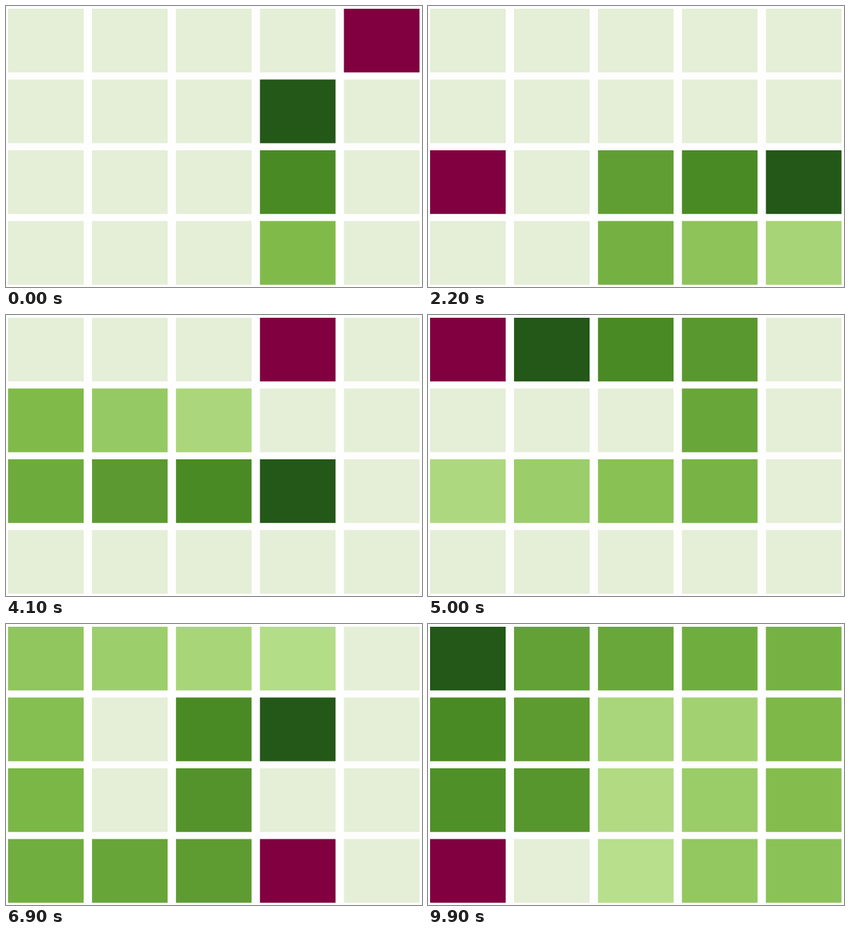
An HTML page with a canvas that plays this animation: 600x407 px, repeating every 10 s.

```html
<!DOCTYPE html>
<html lang="en">
<head>
<meta charset="utf-8">
<title>Snake</title>
<style>
  html, body { margin: 0; width: 100%; height: 100%; overflow: hidden; background: #fefefe; }
  canvas { display: block; }
</style>
</head>
<body>
<canvas id="board" width="600" height="407"></canvas>
<script>
const ctx = document.getElementById('board').getContext('2d');
const COLS = 5, ROWS = 4, LOOP = 10000, FRAME = 100, MOVE = 214, LEAD = 8;
const EMPTY = '#e5eed7', FOOD = '#800040', HEAD = '#235818';
const BODY = [[74, 138, 36], [128, 187, 74], [192, 228, 148]];

// The first two steps lay out the starting body.
const STEPS = 'UU' + 'URDDDL' + 'LURRULLL' + 'LDRRR' + 'UULLLDDDR' + 'RUURDDRUU' + 'ULLLDDLUU';
const START = 2, START_LENGTH = 3;
const DIRS = { U: [0, -1], D: [0, 1], L: [-1, 0], R: [1, 0] };
const path = [[3, 3]];
for (const step of STEPS) {
  const [x, y] = path[path.length - 1], [dx, dy] = DIRS[step];
  path.push([x + dx, y + dy]);
}

// Move numbers at which the snake eats.
const MEALS = [2, 7, 10, 16, 21, 24, 27, 29, 31, 34, 35, 36, 39, 43, 46];
const LAST_FOOD = [0, 3];

function bodyColor(t) {
  const i = t < 0.5 ? 0 : 1, f = t * 2 - i;
  const mix = BODY[i].map((v, c) => Math.round(v + (BODY[i + 1][c] - v) * f));
  return `rgb(${mix})`;
}

function cell([col, row], color) {
  ctx.fillStyle = color;
  ctx.fillRect(3 + col * 121.1, 4 + row * 102.5, 109, 92.2);
}

function draw(move) {
  ctx.fillStyle = '#fefefe';
  ctx.fillRect(0, 0, 600, 407);
  for (let r = 0; r < ROWS; r++)
    for (let c = 0; c < COLS; c++) cell([c, r], EMPTY);

  const eaten = MEALS.filter(m => m <= move).length;
  const length = START_LENGTH + eaten, head = move + START;
  cell(eaten < MEALS.length ? path[MEALS[eaten] + START] : LAST_FOOD, FOOD);
  for (let i = length - 1; i > 0; i--)
    cell(path[head - i], bodyColor((i - 1) / (length - 1)));
  cell(path[head], HEAD);
}

const begin = performance.now();
let shown = -1;
function tick() {
  const time = (performance.now() - begin) % LOOP;
  const snapped = Math.floor(time / FRAME) * FRAME;
  const move = Math.floor((snapped + LEAD) / MOVE);
  if (move !== shown) draw(shown = move);
  requestAnimationFrame(tick);
}
tick();
</script>
</body>
</html>
```
